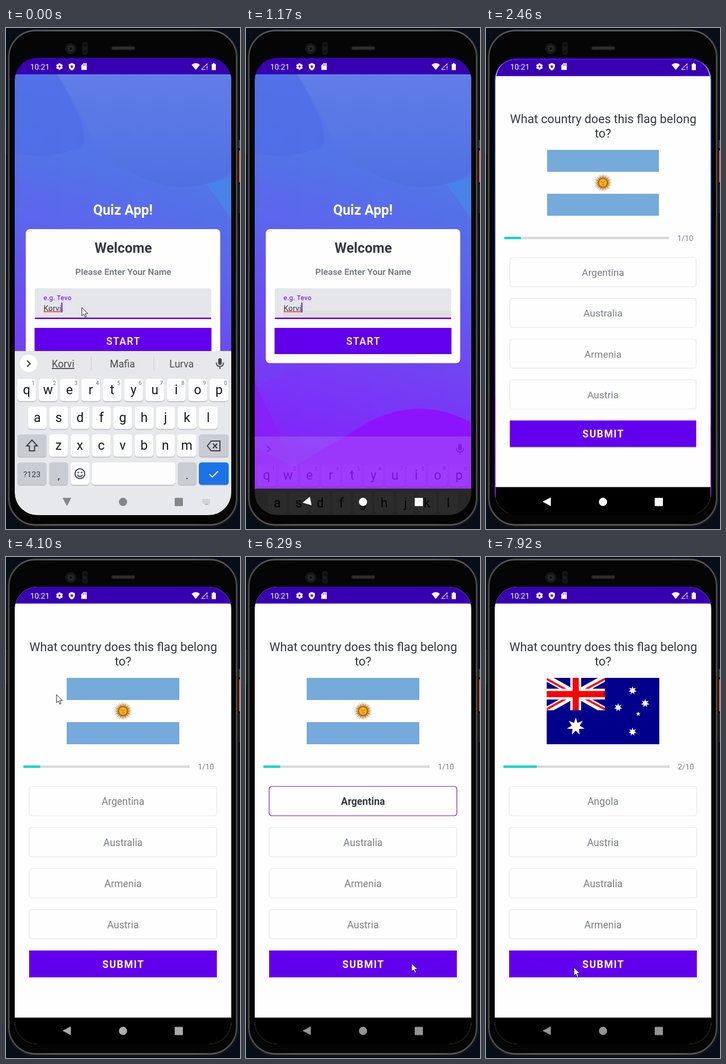
These frames come from a looping animation (455 px wide and 974 px high, 8000 ms). An HTML page:

```html
<!DOCTYPE html>
<html lang="en">
<head>
<meta charset="utf-8">
<title>Quiz App</title>
<style>
  html, body { margin: 0; width: 100%; height: 100%; overflow: hidden; background: #080e18; }
  svg { display: block; width: 455px; height: 974px; font-family: Roboto, "Noto Sans", sans-serif; }
</style>
</head>
<body>
<svg id="stage" viewBox="0 0 455 974"></svg>
<script>
const LOOP = 8000, CENTER_Y = 493, PURPLE = '#6200ee';

// Markup helpers
const rect = (x, y, w, h, fill, rx = 0, extra = '') =>
  `<rect x="${x}" y="${y}" width="${w}" height="${h}" rx="${rx}" fill="${fill}" ${extra}/>`;
const circle = (x, y, r, fill, extra = '') => `<circle cx="${x}" cy="${y}" r="${r}" fill="${fill}" ${extra}/>`;
const path = (d, fill, extra = '') => `<path d="${d}" fill="${fill}" ${extra}/>`;
const line = (d, color, width = 2, extra = '') =>
  path(d, 'none', `stroke="${color}" stroke-width="${width}" ${extra}`);
const text = (s, x, y, size, fill, extra = '') =>
  `<text x="${x}" y="${y}" font-size="${size}" fill="${fill}" ${extra}>${s}</text>`;
const label = (s, x, y, size, fill, extra = '') => text(s, x, y, size, fill, 'text-anchor="middle" ' + extra);
const bold = 'font-weight="700"';

function star(x, y, r, points, inner, fill) {
  const corners = Array.from({ length: points * 2 }, (_, i) => {
    const a = i * Math.PI / points, d = i % 2 ? r * inner : r;
    return `${(x + d * Math.sin(a)).toFixed(1)} ${(y - d * Math.cos(a)).toFixed(1)}`;
  });
  return path(`M${corners.join('L')}Z`, fill);
}

function phone() {
  return rect(0, 0, 455, 974, '#080e18')
    + rect(453, 238, 3, 62, '#d8583c')
    + rect(452, 218, 3, 16, '#444') + rect(452, 303, 3, 57, '#222') + rect(0, 180, 3, 66, '#16181c')
    + rect(2.5, 2.5, 450, 969, '#141414', 56)
    + rect(5.5, 5, 443, 961, '#050505', 52, 'stroke="url(#rim)" stroke-width="3"')
    + circle(126, 40, 10.5, '#171717') + circle(126, 40, 6, '#292929') + circle(126, 40, 2.5, '#0d1014')
    + rect(149, 28, 9, 23, '#101010', 4, 'stroke="#222"') + circle(153.5, 40, 3, '#1d1d1d')
    + rect(205, 35.5, 46, 7, '#242424', 3.5)
    + line('M208 39H249', '#3b3b3b', 3, 'stroke-dasharray="2 1.5"');
}

function wallpaper() {
  return rect(17, 90, 421, 806, 'url(#sky)')
    + path('M17 90H100L140 168Q158 215 150 232L80 250L17 245Z', '#4d68e6', 'opacity=".45"')
    + path('M100 90H438V280Q345 340 235 276Q190 250 170 220Q150 170 100 90Z', 'url(#disc)')
    + path('M438 288V372Q415 338 390 304Q420 297 438 288Z', '#448bea', 'opacity=".7"')
    + path('M17 470L438 335V480L17 700Z', '#4e70ec', 'opacity=".1"')
    + path('M17 688L93 852L17 815Z', '#8a1cfa', 'opacity=".65"')
    + path('M17 815L93 853L215 780Q327 707 438 767V896H17Z', '#8c14fd');
}

function home() {
  return rect(17, 58, 421, 33, '#3700b3') + wallpaper()
    + rect(17, 895.5, 421, 52, '#000')
    + label('Quiz App!', 227.5, 362.5, 26.8, '#fff', bold)
    + rect(38.5, 391, 378, 260.5, '#fefefe', 8)
    + label('Welcome', 228, 437, 26.8, '#363a43', bold)
    + label('Please Enter Your Name', 228, 480, 17.15, '#7a8089', bold)
    + '<path id="field" d="M56 565V510Q56 506 60 506H395Q399 506 399 510V565Z"/>'
    + '<rect id="hover" x="73" y="549.5" width="326" height="14" fill="#dedede"/>'
    + rect(56, 563, 343, 2.8, PURPLE, 0, 'id="underline"')
    + text('e.g. Tevo', 73, 529, 12.9, PURPLE, 'letter-spacing=".4"')
    + text('Korvi', 73, 549.5, 15.2, '#363a43')
    + line('M73 551.5H108', '#ee4b4b', 2)
    + rect(107.6, 534, 2, 19, PURPLE, 0, 'id="caret"')
    + rect(55.5, 583, 344, 51, PURPLE)
    + label('START', 228.3, 616, 19.5, '#fff', 'font-weight="500" letter-spacing="1.5"');
}

function argentina() {
  const rays = Array.from({ length: 32 }, (_, i) =>
    `<path d="M-1.3 -7L0 -18L1.3 -7Z" fill="${i % 2 ? '#c98a3a' : '#9c6228'}" transform="rotate(${i * 11.25})"/>`).join('');
  return rect(118, 235, 219, 129, '#fefefe') + rect(118, 235, 219, 43, '#75aadb') + rect(118, 321, 219, 43, '#75aadb')
    + `<g transform="translate(227.5 299.5)">${rays}${circle(0, 0, 8.2, '#f6b40e', 'stroke="#85340a" stroke-width=".8"')}`
    + line('M-4 -2H-1.2M1.2 -2H4M0 -2V1.5M-2 3.5H2', '#a5610c', 1) + '</g>';
}

function australia() {
  const cross = 'M118 235L231 298M231 235L118 298';
  const stars = [[285, 259.5], [257, 292.5], [309.5, 284.5], [285, 340]];
  return rect(118, 235, 219, 129, '#00008b')
    + '<g clip-path="url(#canton)">' + line(cross, '#fff', 13)
    + line('M118 237L174 268M231 296L174 265M231 237L174 268M118 296L174 265', '#f00', 4)
    + line('M174.5 235V298M118 266.5H231', '#fff', 21) + line('M174.5 235V298M118 266.5H231', '#f00', 12) + '</g>'
    + star(174.5, 329.5, 17.5, 7, .45, '#fff')
    + stars.map(([x, y]) => star(x, y, 8.4, 7, .45, '#fff')).join('')
    + star(296, 305, 4.8, 5, .42, '#fff');
}

function quiz() {
  const options = [0, 1, 2, 3].map(i =>
    rect(45, 446 + i * 79.8, 365, 57, '#fefefe', 5, `id="box${i}" stroke="#e6e6e8" stroke-width="1.2"`)
    + label('', 227.5, 482 + i * 80, 19.4, '#7a8089', `id="option${i}"`)).join('');
  return path('M17 947V102Q17 58 61 58H394Q438 58 438 102V947Z', '#fefefe')
    + path('M18.500 90.5Q24 58 61 58H394Q431 58 436.500 90.5Z', '#3700b3')
    + rect(17, 895.5, 421, 52, '#000')
    + label('What country does this flag belong', 228, 183, 23.7, '#363a43')
    + label('to?', 227.5, 211, 23.7, '#363a43')
    + `<g id="flag1">${argentina()}</g><g id="flag2">${australia()}</g>`
    + rect(34, 405.3, 323, 4.6, '#d9d9d9') + rect(34, 405.3, 32.3, 4.6, '#03dac5', 0, 'id="bar"')
    + text('', 373, 413, 15, '#7a8089', 'id="count"')
    + options
    + rect(45, 767, 365, 52, '#000', 1, 'opacity=".13"') + rect(45, 765, 365, 52, PURPLE)
    + label('SUBMIT', 228.3, 798.5, 19.5, '#fff', bold + ' id="action" letter-spacing="1.7"');
}

function keyboard() {
  const key = (x, y, w = 36.5, fill = '#fdfdfe') =>
    rect(x, y + 1.2, w, 44, '#b9bcc2', 5.5) + rect(x, y, w, 43.5, fill, 5.5);
  const row = (letters, x, y) => [...letters].map((c, i) => {
    const left = x + i * 41.55;
    return key(left, y) + label(c, left + 18.2, y + 30, 25, '#16181c');
  }).join('');
  const digits = [...'1234567890'].map((d, i) => label(d, 53 + i * 41.55, 694, 10.5, '#666b70')).join('');
  const dots = [0, 1, 2].map(i =>
    line(`M382.500 ${917 + i * 3}H397.500`, '#9a9a9e', 1.5, 'stroke-dasharray="1.6 1.4"')).join('');
  return rect(17, 628, 421, 320, '#e7e8ec')
    + circle(44, 652, 17, '#fff', 'class="strip"') + line('M41 646.5L47 652.5L41 658.5', '#33363a', 2.2)
    + '<g class="strip">' + label('Korvi', 111, 660, 19.4, '#4a4d52', 'text-decoration="underline"')
    + label('Mafia', 226.5, 660, 19.4, '#4a4d52') + label('Lurva', 341.5, 660, 19.4, '#4a4d52')
    + line('M165.5 639V665M287.5 639V665', '#c8cacf', 1) + '</g>'
    + rect(412.5, 642, 7, 13, '#43464a', 3.5) + line('M409 650.5Q409 658 416 658T423 650.5M416 658V663', '#43464a', 2)
    + row('qwertyuiop', 22, 682) + digits + row('asdfghjkl', 42.7, 736) + row('zxcvbnm', 84, 790)
    + key(22, 790, 57, '#c9ccd2') + line('M50.5 801L61 812.5H55.5V822H45.5V812.5H40Z', '#33363a', 2)
    + key(375, 790, 58, '#c9ccd2') + line('M399 803H416V822H399L391.5 812.5ZM402.5 808L410.5 817M410.5 808L402.5 817', '#33363a', 2)
    + key(22, 844.5, 57, '#c9ccd2') + label('?123', 50.5, 873, 15.5, '#33363a')
    + key(84, 844.5, 36.5, '#c9ccd2') + label(',', 102.5, 877, 21, '#222')
    + key(125.5, 844.5) + circle(143.7, 866.5, 9.5, 'none', 'stroke="#33363a" stroke-width="2"')
    + circle(140.3, 864, 1.5, '#33363a') + circle(147, 864, 1.5, '#33363a') + line('M138.5 868.5Q143.7 875.5 149 868.5', '#33363a', 2)
    + key(167, 844.5, 162) + key(334, 844.5, 36.5, '#c9ccd2') + label('.', 352, 877, 21, '#222')
    + key(375, 844.5, 58, '#1a73e8') + line('M395.5 867.5L401 873L412.5 861.5', '#fff', 2.2)
    + dots + rect(386.5, 925, 7, 1.5, '#9a9a9e');
}

function systemIcons() {
  const teeth = [0, 60, 120].map(a => rect(102, 68.5, 4, 13, '#fff', 1, `transform="rotate(${a} 104 75)"`)).join('');
  return text('10:21', 47, 80.5, 15.2, '#fff')
    + teeth + circle(104, 75, 4.8, '#fff') + circle(104, 75, 2, '#3700b3')
    + path('M128 68L134 70.5V74.5Q134 80 128 82.5Q122 80 122 74.5V70.5Z', '#fff')
    + star(128, 75, 3.4, 5, .5, '#3700b3')
    + path('M150.5 68.5H157V81.5H146.5V72.5Z', '#fff') + line('M150.5 70.5V73M152.7 70.5V73M155 70.5V73', '#3700b3', 1)
    + path('M361 71.5Q369 65 377 71.5L369 81.5Z', '#fff')
    + line('M380 80.8L391 69.5V73M380 80.8H388', '#fff', 1.1) + line('M391 74.5V78.5M391 79.8V81.3', '#fff', 1.5)
    + path('M400 70H402.3V68.3H405.7V70H408V82H400Z', '#fff')
    + '<g id="nav"><path id="back" d="M-8.5 0L7.5 -8.5V8.5Z"/>'
    + '<circle cx="227.5" cy="921.3" r="8"/><rect x="328" y="913.5" width="16" height="16" rx="1"/></g>';
}

const stage = document.getElementById('stage');
stage.innerHTML = `<defs>
  <linearGradient id="sky" gradientUnits="userSpaceOnUse" x1="320" y1="90" x2="120" y2="840">
    <stop offset="0" stop-color="#5a78e5"/><stop offset=".27" stop-color="#5373e8"/>
    <stop offset=".45" stop-color="#5c64ed"/><stop offset=".68" stop-color="#7046f2"/><stop offset="1" stop-color="#8422fb"/>
  </linearGradient>
  <linearGradient id="disc" x1="0" y1="0" x2="0" y2="1">
    <stop offset="0" stop-color="#617de7"/><stop offset=".6" stop-color="#5676e5"/><stop offset="1" stop-color="#5070e2"/>
  </linearGradient>
  <linearGradient id="rim"><stop offset="0" stop-color="#4a4a4a"/><stop offset=".2" stop-color="#606060"/>
    <stop offset=".8" stop-color="#606060"/><stop offset="1" stop-color="#4a4a4a"/></linearGradient>
  <clipPath id="screen"><rect x="17" y="58" width="421" height="889" rx="44"/></clipPath>
  <clipPath id="canton"><rect x="118" y="235" width="113" height="63"/></clipPath>
</defs>${phone()}
<g clip-path="url(#screen)">${rect(17, 58, 421, 889, '#000')}
  <g id="home">${home()}</g><g id="quiz">${quiz()}</g><g id="keyboard">${keyboard()}</g>${systemIcons()}
</g>
${path('M0 0V16L3.8 12.6L6.4 18.6L9 17.5L6.4 11.6H11.5Z', '#fff', 'id="cursor" stroke="#111" stroke-width="1"')}`;

const $ = id => document.getElementById(id);
const set = (id, attrs) => Object.entries(attrs).forEach(([k, v]) => $(id).setAttribute(k, v));
const show = (id, on) => set(id, { visibility: on ? 'visible' : 'hidden' });
const clamp = v => Math.max(0, Math.min(1, v));
const within = (t, a, b) => t >= a && t < b;

// The picture updates in bursts: first change, last change, number of steps
const bursts = [[150, 1170, 8], [1320, 2310, 8], [2460, 2730, 3], [3560, 4520, 8],
  [4640, 5580, 8], [5730, 5730, 1], [6290, 7230, 7], [7380, 7920, 5]];

function snap(t) {
  const burst = bursts.filter(b => b[0] <= t).pop();
  if (!burst) return 0;
  const [start, end, n] = burst, step = (end - start) / (n - 1) || 1;
  return Math.min(end, start + step * Math.floor((t - start) / step + .1));
}

// Pointer strokes: time, x, y
const strokes = [
  [[0, 147.5, 543.5], [150, 147, 552], [600, 128, 800], [880, 118, 922], [1040, 118, 952]],
  [[1600, 180, 900], [1900, 230, 680], [2180, 250, 612]],
  [[3560, 330, 330], [3840, 190, 300], [4100, 92, 270], [4250, 200, 225], [4520, 378, 189]],
  [[4640, 412, 250], [4910, 360, 470], [5180, 360, 476], [5580, 344, 784], [5730, 322, 790],
    [6600, 322, 790], [7230, 230, 803], [7515, 205, 805], [7920, 171, 798]],
];

function pointer(t) {
  const keys = strokes.find(s => t >= s[0][0] && t <= s[s.length - 1][0]);
  if (!keys) return null;
  const i = Math.max(1, keys.findIndex(k => k[0] >= t));
  const [t0, x0, y0] = keys[i - 1], [t1, x1, y1] = keys[i];
  const p = (t - t0) / (t1 - t0);
  return [x0 + (x1 - x0) * p, y0 + (y1 - y0) * p];
}

const scale = s => `translate(227.5 ${CENTER_Y}) scale(${s}) translate(-227.5 ${-CENTER_Y})`;
const answers = [['Argentina', 'Australia', 'Armenia', 'Austria'], ['Angola', 'Austria', 'Australia', 'Armenia']];

function render(now) {
  const t = snap(now);

  const hide = clamp((t - 1020) / 288);
  set('keyboard', { transform: `translate(0 ${319 * hide})`, opacity: clamp(1 - hide * 1.6) });
  document.querySelectorAll('.strip').forEach(e => e.setAttribute('visibility', hide ? 'hidden' : 'visible'));
  show('keyboard', hide < 1);
  const hovered = t >= 1300;
  set('field', { fill: hovered ? '#dfdfdf' : '#e4e6ea' });
  set('underline', hovered ? { y: 563.6, height: 2 } : { y: 563, height: 2.8 });
  show('hover', within(t, 1100, 1300));
  show('caret', !within(t, 450, 950) && !within(t, 1550, 2050));

  const dim = clamp((t - 3560) / 700);
  const gray = Math.round(hide < .3 ? 134 : 255 - 107 * dim);
  set('nav', { fill: `rgb(${gray},${gray},${gray})` });
  set('back', { transform: `translate(118.5 921) rotate(${-90 * clamp(1 - hide * 1.68)})` });

  const opened = t >= 2460, settle = clamp((t - 2460) / 270);
  set('home', { transform: scale(opened ? 1.04 : t >= 2300 ? 1.0095 : 1) });
  set('quiz', { transform: scale(1 - .0075 * (1 - settle) ** 2) });
  show('quiz', opened);

  const second = t >= 7510, selected = t >= 5040 && !second, checked = t >= 6590 && !second;
  $('flag1').style.display = second ? 'none' : '';
  $('flag2').style.display = second ? '' : 'none';
  set('bar', { width: second ? 64.8 : 32.4 });
  $('count').textContent = second ? '2/10' : '1/10';
  answers[+second].forEach((name, i) => { $('option' + i).textContent = name; });
  set('option0', { 'font-weight': selected ? 700 : 400, fill: selected ? '#363a43' : '#7a8089' });
  set('box0', { fill: checked ? '#4caf50' : '#fefefe', stroke: checked ? '#4caf50' : selected ? PURPLE : '#e6e6e8' });
  $('action').textContent = checked ? 'GO TO NEXT QUESTION' : 'SUBMIT';

  const at = pointer(t);
  $('cursor').style.display = at ? '' : 'none';
  if (at) set('cursor', { transform: `translate(${at[0]} ${at[1]})` });
}

const begin = performance.now();
function tick() {
  render((performance.now() - begin) % LOOP);
  requestAnimationFrame(tick);
}
tick();
</script>
</body>
</html>
```
